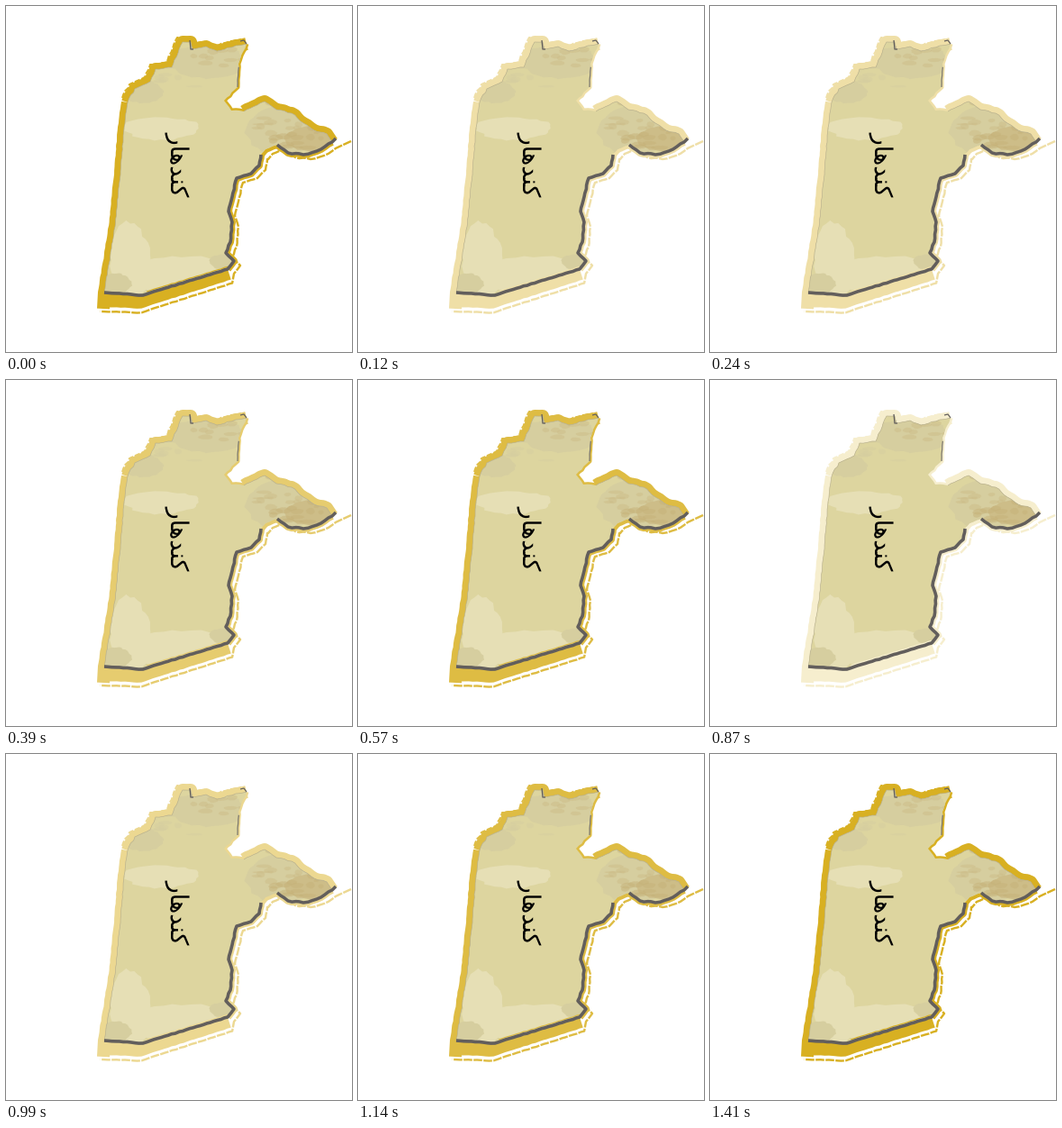
Write a matplotlib script that moves like this. It is 384 px wide and 384 px high and loops after 1440 ms.

```python
import numpy as np
import matplotlib.pyplot as plt
from matplotlib.animation import FuncAnimation
from matplotlib.patches import Polygon, PathPatch
from matplotlib.path import Path
from matplotlib.textpath import TextPath

SIZE, DPI = 384, 96
FRAMES, STEP = 48, 30
PX = 72 / DPI
GOLD = np.array([216, 176, 34]) / 255
GREY = "#625e5c"
rng = np.random.default_rng(7)

fig = plt.figure(figsize=(SIZE / DPI, SIZE / DPI), dpi=DPI, facecolor="white")
ax = fig.add_axes([0, 0, 1, 1])
ax.set(xlim=(0, SIZE), ylim=(SIZE, 0))
ax.axis("off")
glow = []


def coast(*corners, shake=0.7, step=4):
    """Join the corners with short, slightly shaken pieces."""
    pts = np.array(corners, float)
    out = []
    for a, b in zip(pts, pts[1:]):
        n = max(1, int(np.hypot(*(b - a)) / step))
        part = a + (b - a) * np.linspace(0, 1, n, endpoint=False)[:, None]
        part[1:] += rng.uniform(-shake, shake, part[1:].shape)
        out.append(part)
    return np.vstack(out + [pts[-1:]])


def stroke(pts, color, width, z, **style):
    line, = ax.plot(*np.transpose(pts), color=color, lw=width * PX, zorder=z,
                    solid_joinstyle="round", solid_capstyle="butt", **style)
    return line


def gold(pts, width, z=1, **style):
    glow.append(stroke(pts, GOLD, width, z, **style))


# Corners of the province, clockwise from the south-west
SW, NW, NE = (109, 318), (135, 107), (267, 42)
BAY, EAST, SE = (264, 117), (362, 151), (246, 292)
west = coast(SW, (121, 245), (126, 195), (131, 135), NW, shake=0.4)
north = coast(NW, (143, 92), (160, 84), (166, 70), (184, 68), (196, 40),
              (205, 40), (207, 48), (222, 45), (234, 50), (255, 44), NE)
bay = coast(NE, (258, 64), (257, 90), (242, 105), (250, 116), BAY)
ridge = coast(BAY, (287, 106), (300, 115), (317, 119), (330, 130),
              (342, 138), (356, 142), EAST)
cape = coast(EAST, (345, 161), (330, 165), (313, 163), (301, 154))
gap = coast((301, 154), (288, 159), (283, 165))
river = coast((283, 165), (281, 177), (272, 186), (256, 191), (247, 228),
              (251, 240), (249, 262), (244, 274), (253, 283), SE, shake=0.5)
south = coast(SE, (200, 306), (152, 321), SW, shake=0.4)

# Pulsing border: the inner half of each stroke hides under the land
gold(np.vstack([[(108, 336)], west]), 14)
gold(north, 14)
gold(bay, 5)
gold(ridge, 14)
gold(np.vstack([cape, gap, river]), 8)

# Thick southern band, then a broken thin line further out
drop = np.column_stack([0.07 * (south[:, 0] - 180),
                        20 - 0.04 * (south[:, 0] - SW[0])])
band = Polygon(np.vstack([south, (south + 0.8 * drop)[::-1]]), fc=GOLD,
               ec="none", zorder=1)
ax.add_patch(band)
outer = np.vstack([[(383, 150)], cape + (8, 5), gap + (8, 5),
                   river + (7, 5), south + (0.5, 1) + drop])
gold(outer, 2.4, dashes=(4, 0.6))
gold(north + (-6, -5), 2, dashes=(3, 1))

land = Polygon(np.vstack([west, north, bay, ridge, cape, gap, river, south]),
               fc="#ddd59f", ec="none", zorder=3)
ax.add_patch(land)


def blob(x, y, rx, ry, color, alpha=1):
    """Ragged ellipse, cut off at the edge of the land."""
    t = np.linspace(0, 2 * np.pi, 36, endpoint=False)
    lobes = sum(np.sin(k * t + rng.uniform(0, 6)) / k for k in (2, 3, 5))
    r = 1 + 0.1 * lobes + rng.uniform(-0.07, 0.07, t.size)
    patch = Polygon(np.column_stack([x + rx * r * np.cos(t),
                                     y + ry * r * np.sin(t)]),
                    fc=color, ec="none", alpha=alpha, zorder=3.5)
    ax.add_patch(patch)
    patch.set_clip_path(land)


def streaks(x, y, rx, ry, color, count=16):
    """Small slanted patches that suggest hills."""
    for _ in range(count):
        blob(x + rng.normal(0, rx / 2), y + rng.normal(0, ry / 2),
             rng.uniform(3, 9), rng.uniform(1, 3.5), color, 0.5)


PALE, DIM, TAN = "#e6dfb5", "#d6ce9f", "#cdbd88"
blob(172, 136, 40, 13, PALE)
blob(138, 282, 24, 40, PALE)
blob(195, 298, 58, 20, PALE)
blob(123, 308, 15, 12, DIM)
blob(240, 284, 13, 9, DIM)
blob(152, 95, 22, 13, DIM)
blob(222, 62, 46, 18, DIM)
blob(312, 136, 48, 27, DIM)
blob(338, 147, 28, 14, TAN)
streaks(238, 58, 34, 18, TAN)
streaks(185, 78, 40, 18, DIM)
streaks(308, 130, 38, 20, TAN)
streaks(325, 145, 38, 14, "#c6b279")

# Hairlines, and the heavy shadow along the south and east
for line in (west, north, ridge):
    stroke(line, "#b5ad8c", 0.6, 4)
stroke([(204, 38), (205, 48), (208, 48)], GREY, 1.3, 5)
stroke([(260, 39), (264, 38), (267, 42)], GREY, 1.2, 5)
stroke(bay[(bay[:, 1] > 64) & (bay[:, 1] < 92)], "#77736a", 1.2, 5)
gold(south[:-11] + (0, -2.6), 1.2, 4)
stroke(np.vstack([river, south]), GREY, 3.6, 5)
stroke(np.vstack([[(366, 147)], cape]), GREY, 3.5, 5)

# Arabic letters in presentation forms, in visual order, turned clockwise
word = TextPath((0, 0), "\uFEAD\uFE8E\uFEEB\uFEAA\uFEE8\uFB90", size=27)
verts = word.vertices[:, ::-1]
box = Path(verts, word.codes).get_extents()
verts = verts + (190, 176.5) - (box.min + box.max) / 2
ax.add_patch(PathPatch(Path(verts, word.codes), fc="black", ec="none", zorder=8))

# Strength of the glow: two quick fades, each with a slower return
KEYS = [0, 5, 13, 19, 23, 29, 38, 47]
LEVELS = [1, 0.25, 0.65, 0.85, 1, 0.22, 0.85, 1]


def draw(i):
    color = 1 - np.interp(i, KEYS, LEVELS) * (1 - GOLD)
    band.set_facecolor(color)
    for line in glow:
        line.set_color(color)
    return [band, *glow]


anim = FuncAnimation(fig, draw, frames=FRAMES, interval=STEP,
                     repeat=True, repeat_delay=0)
plt.show()
```
